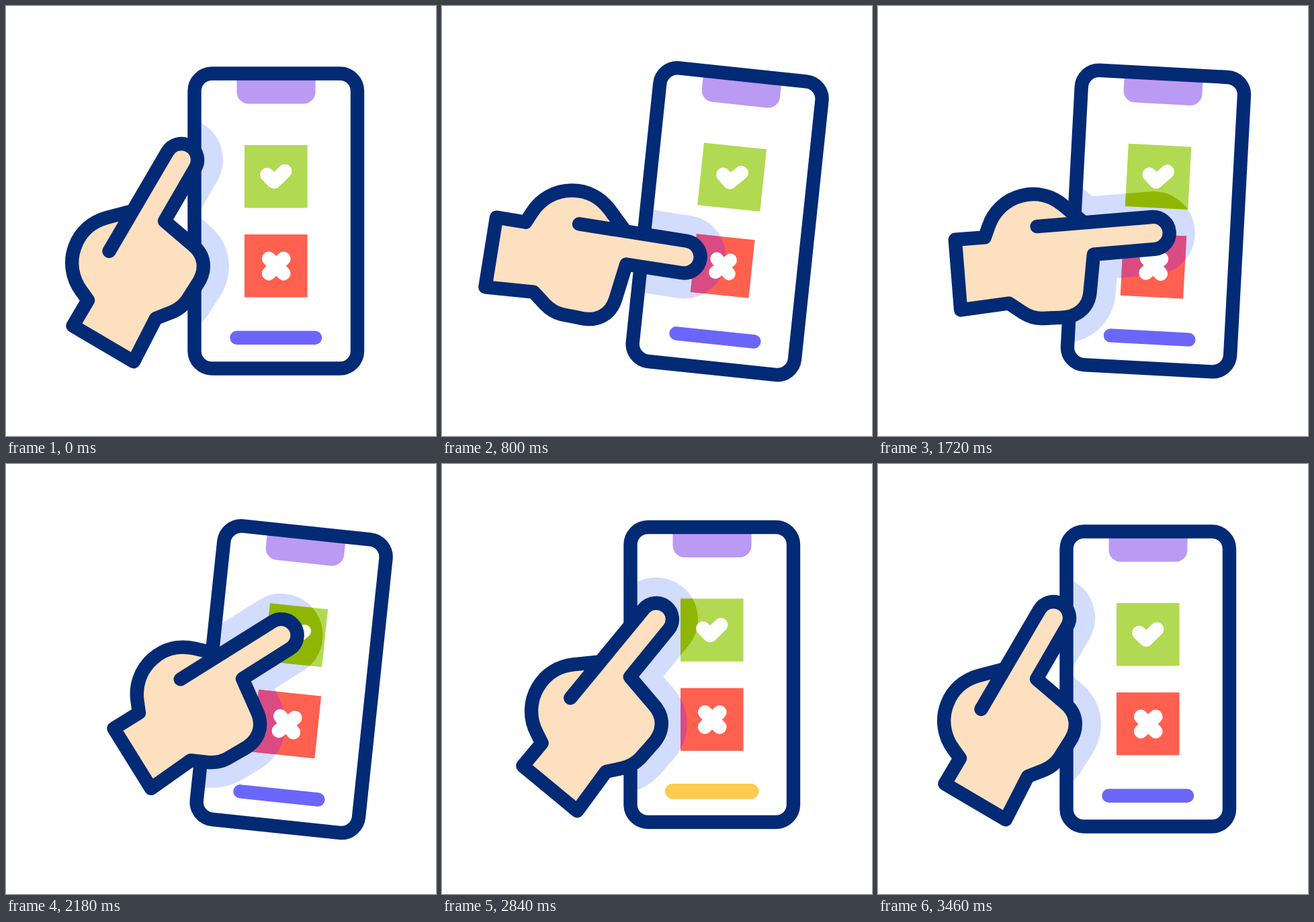
An HTML page that plays this animation: 640x640 px, repeating every 3600 ms.

```html
<!DOCTYPE html>
<html lang="en">
<head>
<meta charset="utf-8">
<title>Choosing on a phone</title>
<style>
  html, body { margin: 0; width: 100%; height: 100%; overflow: hidden; background: #fff; }
  svg { display: block; width: 100vw; height: 100vh; }
  .line { stroke: #032a75; stroke-width: 20.4; }
  .halo { stroke-width: 76; }
  .glyph { stroke: #fff; stroke-width: 20.8; }
  .body { x: 280.5px; y: 100.5px; width: 242.5px; height: 439px; rx: 26px; }
  .box { x: 355px; width: 93.6px; height: 93.4px; }
  .box.yes { y: 207px; }
  .box.no { y: 340px; }
</style>
</head>
<body>
<svg viewBox="0 0 640 640" fill="none" stroke-linecap="round" stroke-linejoin="round">
  <defs>
    <path id="hand"/>
    <clipPath id="screen"><rect class="phone body"/></clipPath>
    <mask id="shade" maskUnits="userSpaceOnUse" x="0" y="0" width="640" height="640">
      <use class="hand halo" href="#hand" fill="#fff" stroke="#fff"/>
    </mask>
  </defs>

  <g class="phone">
    <rect class="body" fill="#fff"/>
    <path d="M343.5 105V128a17.5 17.5 0 0 0 17.5 17.5h82a17.5 17.5 0 0 0 17.5-17.5V105z" fill="#bb9af3"/>
  </g>
  <g clip-path="url(#screen)">
    <use class="hand halo" href="#hand" fill="#d2dcfd" stroke="#d2dcfd"/>
  </g>
  <g class="phone">
    <rect class="yes box" fill="#b1da52"/>
    <rect class="no box" fill="#ff6050"/>
  </g>
  <g mask="url(#shade)">
    <g class="phone">
      <rect class="yes box" fill="#90b605"/>
      <rect class="no box" fill="#da4b84"/>
    </g>
  </g>
  <g class="phone">
    <path class="yes glyph" d="M388.5 251.2L399 261.6L415 245.8"/>
    <path class="no glyph" d="M391.2 376L413.2 398M413.2 376L391.2 398"/>
    <path id="bar" d="M343.5 493.7H460"/>
    <rect class="line body"/>
  </g>
  <use class="hand line" href="#hand" fill="#fce0bf"/>
</svg>
<script>
const LOOP = 3600;
const PURPLE = [107, 102, 250], YELLOW = [255, 203, 80];
const REST = { x: 206, y: 391.4 };   // the point the hand turns around

// Smooth step from 0 to 1 between two times.
function ease(t, start, end) {
  const u = Math.min(1, Math.max(0, (t - start) / (end - start)));
  return u * u * (3 - 2 * u);
}
// Up over `ramp` ms, a hold, then down again.
const pulse = (t, start, ramp, end) => ease(t, start, start + ramp) - ease(t, end - ramp, end);

// Hand outline; the finger gets shorter while it presses.
function handPath(press) {
  const dx = -5 * press, dy = 8.7 * press;
  return `M153.5 365L${240.2 + dx} ${217 + dy}A24 24 0 0 1 ${281.8 + dx} ${241 + dy}
    L${236 + dx * 0.2} ${320 + dy * 0.2}L277 355
    C296 370 300 393 283.5 416L269.5 438Q261 450 246 456L223 465L190 529.3L99.5 476L122 438L112 424
    C98 405 94 380 103 357C111 336 128 321 150 315L188 305`;
}

const all = (selector, name, value) =>
  document.querySelectorAll(selector).forEach(el => el.setAttribute(name, value));
const scaleAt = (x, y, s) => `translate(${x} ${y}) scale(${s}) translate(${-x} ${-y})`;

function drawPhone(t, pressNo, pressYes, tap) {
  const tilt = 3 * ease(t, 0, 460) + 3 * tap + 3 * ease(t, 1690, 2020) - 6 * ease(t, 2480, 2720);
  const hop = t > 2470 && t < 3460 ? -13 * Math.sin(Math.PI * (t - 2470) / 495) ** 2 : 0;
  const alert = pulse(t, 2500, 230, 3450);
  const color = PURPLE.map((c, i) => Math.round(c + (YELLOW[i] - c) * alert));

  all('.phone', 'transform', `translate(0 ${hop}) rotate(${tilt} 407 538.5)`);
  all('.yes', 'transform', scaleAt(401.75, 253.6, 1 - 0.075 * pressYes));
  all('.no', 'transform', scaleAt(402, 386.8, 1 - 0.075 * pressNo));
  all('#bar', 'stroke', `rgb(${color})`);
  all('#bar', 'stroke-width', 20.4 + 2.6 * alert);
}

function drawHand(t, press, tap) {
  const arrive = ease(t, 0, 450);
  const cross = ease(t, 1525, 1970);
  const push = tap + ease(t, 1970, 2150);
  const stay = 1 - ease(t, 2490, 3090);
  const x = REST.x + stay * (95.4 * cross - 7.4 * push);
  const y = REST.y + stay * (arrive - 14.9 * cross - 9.5 * push);
  const turn = (68 * arrive - 41 * ease(t, 1525, 2045) + 0.6 * push) * (1 - ease(t, 2490, 3060));

  all('#hand', 'd', handPath(press));
  all('.hand', 'transform', `translate(${x} ${y}) rotate(${turn}) translate(${-REST.x} ${-REST.y})`);
}

function frame() {
  const t = performance.now() % LOOP;
  const tap = pulse(t, 460, 240, 1300);
  const pressNo = pulse(t, 700, 120, 1060);
  const pressYes = pulse(t, 2000, 120, 2360);
  drawPhone(t, pressNo, pressYes, tap);
  drawHand(t, pressNo + pressYes, tap);
  requestAnimationFrame(frame);
}
frame();
</script>
</body>
</html>
```
